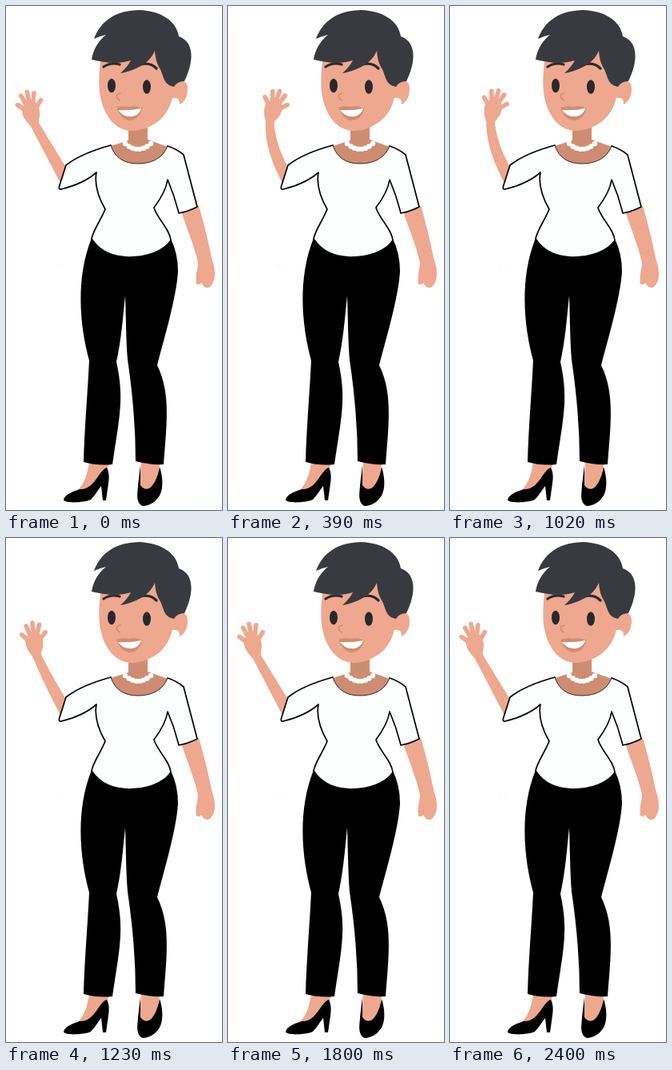
Write an HTML page that moves like this. It is 270 by 630 pixels and loops after 2700 ms.

```html
<!DOCTYPE html>
<html lang="en">
<head>
<meta charset="utf-8">
<title>Waving woman</title>
<style>
  html, body { margin: 0; width: 100%; height: 100%; overflow: hidden; background: #fff; }
  svg { display: block; width: 270px; height: 630px; }
  .skin { fill: #eea88f; }
  .shade { fill: #ce8d73; }
  .hair { fill: #393a40; }
  .line { fill: none; stroke-linecap: round; stroke-linejoin: round; }
</style>
</head>
<body>
<svg viewBox="0 0 270 630">
  <path d="M61 323h3M68 324.500h2" stroke="#f1f1f1"/>

  <!-- waving arm -->
  <path id="forearm" class="skin"/>
  <path id="fingers" class="line" stroke="#eea88f" stroke-width="5.600"/>

  <!-- resting arm -->
  <path class="skin" d="M218 254C226 278 236 302 240 321C240 329 236 337 238 347Q241 350 244 346Q250 356 256 350C264 341 261 326 257 315Q250 280 241 250Z"/>

  <!-- feet and shoes -->
  <path class="skin" d="M104 569H129L126 582C119 592 110 602 99 608H87C96 600 102 588 104 569Z"/>
  <path d="M72 617C74 610 84 607 92 604C110 606 116 580 126 577Q130 584 128 597L125 618H121L119 600C115 605 111 612 106 617C98 621 72 622 72 617Z"/>
  <path class="skin" d="M169 569H192L191 584L184 606H167Z"/>
  <path d="M168 574V599C180 614 190 590 192 576C196 588 197 603 192 612C187 620 179 625 171 625C161 621 165 606 165 599Z"/>

  <!-- trousers -->
  <path d="M107 290C85 345 94 407 104 443C102 485 98 528 97 570Q114 575 133 573C142 512 148 490 138 445C144 418 146 391 149 362C150 390 150 418 152 442Q162 510 162 569Q180 574 197 573C201 520 206 484 189 449C197 418 213 365 215 332Q215 309 206 291Z"/>

  <!-- neck and blouse -->
  <path class="shade" d="M153 146H177V167L202 176V200H131V175L153 168Z"/>
  <path id="blouse" fill="#fdfefe" d="M131 174C113 179 90 187 75 199L67 224Q65 230 69 229C85 225 102 218 113 208C110 224 116 240 124 254C119 267 109 280 107 291C118 308 134 313 153 314C175 314 197 307 206 293C205 279 189 266 185 252Q200 232 202 217Q211 238 216 259Q228 257 239 251L222 186Q214 179 202 175C196 191 181 197 165 197C148 197 136 190 131 174Z"/>
  <path class="line" stroke="#000" stroke-width="1.700" d="M131 174C113 179 90 187 75 199L67 224Q65 230 69 229C85 225 102 218 113 208C110 224 116 240 124 254C119 267 109 280 107 291C118 308 134 313 153 314C175 314 197 307 206 293C205 279 189 266 185 252Q200 232 202 217Q211 238 216 259Q228 257 239 251L222 186Q214 179 202 175"/>
  <path class="line" stroke="#000" stroke-width=".8" d="M131 174C136 190 148 197 165 197C181 197 196 191 202 175"/>
  <g id="pearls" fill="#fff"></g>

  <!-- head -->
  <path class="skin" d="M208 97C216 89 228 93 227 104C227 114 222 121 217 123Q218 113 207 115Z"/>
  <path class="skin" d="M119 62C116 82 115 104 119 118C124 139 138 156 157 156C183 155 203 139 208 114L212 85L190 45Z"/>
  <g class="line" stroke="#2b2a2f" stroke-width="3.200">
    <path d="M122 76Q131 70 142 73"/>
    <path d="M168 73Q180 70 188 78"/>
  </g>
  <path class="hair" d="M107 67C109 54 116 43 125 36Q116 38 110 41C116 25 130 6 166 5C193 6 213 18 216 38C236 45 235 70 223 94Q214 94 210 101C195 98 198 86 191 76Q187 69 186 56C179 73 160 81 143 84Q152 76 156 68C141 73 123 71 107 67Z"/>
  <g fill="#29282c">
    <ellipse cx="132" cy="99.500" rx="5" ry="8.700"/>
    <ellipse cx="176" cy="101" rx="5" ry="8.700"/>
  </g>
  <path class="line" d="M143 109Q134 111 142 118" stroke="#cf8b70" stroke-width="1.500"/>
  <path class="shade" d="M138 127Q146 124 154 126Q163 124 170 128C168 139 161 143 153 143Q143 141 138 127Z"/>
  <path fill="#fff" d="M140 130Q156 131 169 128C167 135 161 139 153 138Q145 137 140 130Z"/>
</svg>

<script>
const STEP = 30, LOOP = 2700, REST = 2400, SWING = 600;
const ELBOW = { x: 76, y: 219 }, WRIST = 84, PALM_END = 109;
const $ = id => document.getElementById(id);
const clamp01 = n => Math.min(1, Math.max(0, n));
const rad = deg => deg * Math.PI / 180;

// Heading of the arm at distance s from the elbow, 0 pointing up;
// the curl grows from the elbow to the wrist
const heading = (s, curl) => rad(
  -29.5 + 15 * clamp01((s - WRIST + 5) / 10) + 37 * curl * clamp01(s / WRIST) ** 1.5
);

// Stage point at distance s along the arm and v to its right
function place(s, v, curl) {
  let { x, y } = ELBOW;
  const scale = 1 - 0.04 * curl;
  for (let u = 0; u < s; u++) {
    const len = Math.min(1, s - u) * scale, a = heading(u + 0.5, curl);
    x += Math.sin(a) * len;
    y -= Math.cos(a) * len;
  }
  const a = heading(s, curl);
  return `${(x + v * Math.cos(a)).toFixed(2)} ${(y + v * Math.sin(a)).toFixed(2)}`;
}

// Tapered forearm that widens into the palm
function halfWidth(s) {
  const palm = s > 82 ? 6 * Math.sin(Math.PI * (s - 82) / 34) : 0;
  return 8.2 - 0.034 * s + palm;
}

function forearm(curl) {
  const left = [], right = [];
  for (let s = 0; s <= PALM_END; s += 3) {
    left.push(place(s, -halfWidth(s), curl));
    right.unshift(place(s, halfWidth(s), curl));
  }
  return `M${[...left, ...right].join('L')}Z`;
}

// Five digits fanned round the middle one, shorter towards the sides
function fingers(curl) {
  const base = WRIST + 10;
  let d = '';
  for (let i = -2; i <= 2; i++) {
    const a = rad(3 + 16 * i + 1.4 * i ** 3), len = 29.3 - 1.9 * i * i;
    const at = r => place(base + r * Math.cos(a), r * Math.sin(a), curl);
    d += `M${at(8)}L${at(len)}`;
  }
  return d;
}

// Quick away from the outer pose, slow round the inner one
function swing(t) {
  const p = Math.abs(1 - 2 * (t % SWING) / SWING);
  return 1 - p ** 1.5;
}

function draw(ms) {
  const t = Math.min(REST, Math.floor(ms % LOOP / STEP) * STEP);
  const curl = swing(t);
  $('forearm').setAttribute('d', forearm(curl));
  $('fingers').setAttribute('d', fingers(curl));
}

$('pearls').innerHTML = Array.from({ length: 8 }, (_, i) => {
  const u = i / 7 * 2 - 1;
  return `<circle cx="${165 + 16 * u}" cy="${179 - 7 * u * u}" r="3.200"/>`;
}).join('');

let start;
function tick(now) {
  start ??= now;
  draw(now - start);
  requestAnimationFrame(tick);
}
draw(0);
requestAnimationFrame(tick);
</script>
</body>
</html>
```
